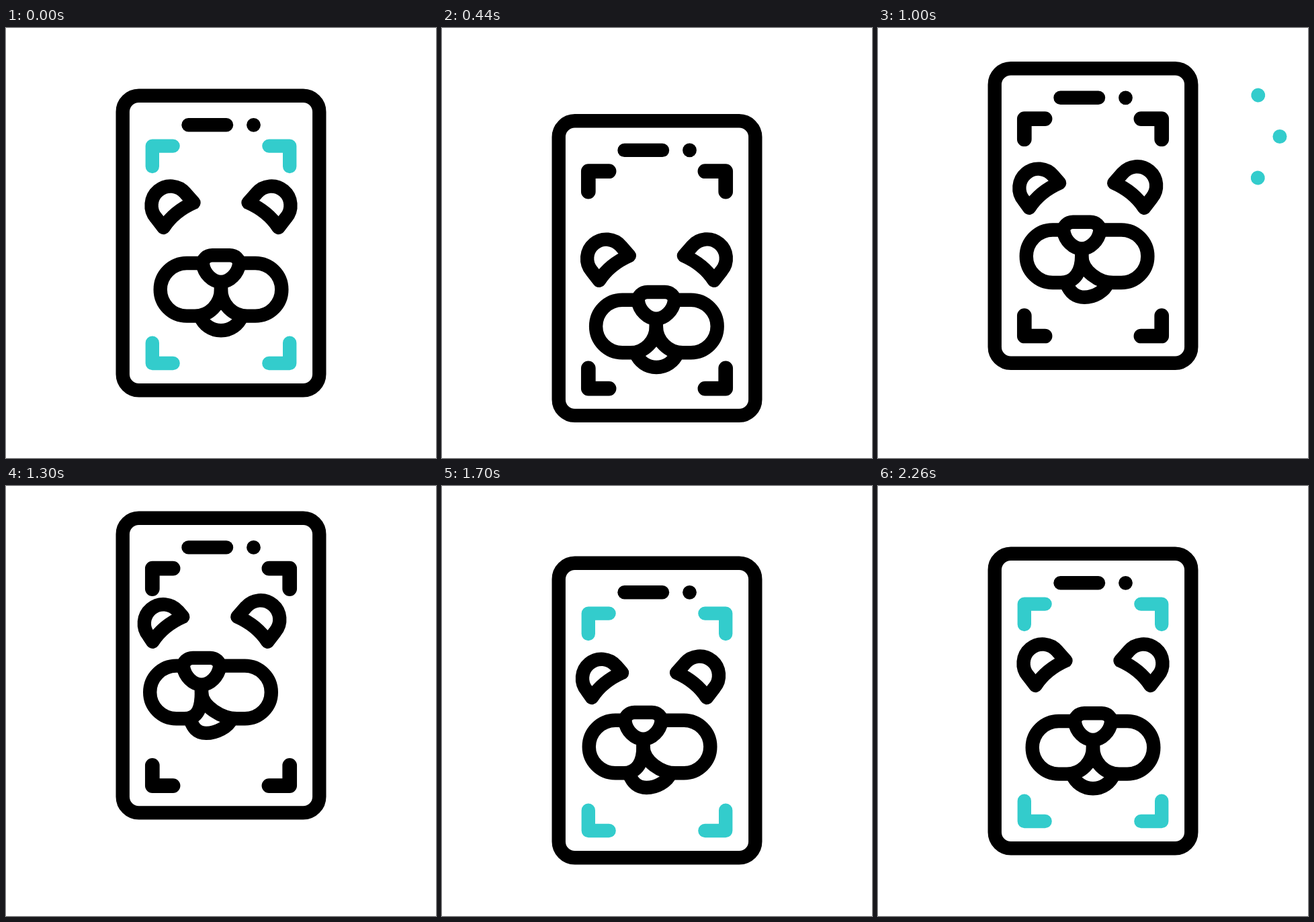
These frames come from a looping animation (640 by 640 pixels, 2400 ms). An HTML page with a canvas:

```html
<!DOCTYPE html>
<html lang="en">
<head>
<meta charset="utf-8">
<title>Face scan</title>
<style>
  html, body { margin: 0; width: 100%; height: 100%; overflow: hidden; background: #fff; }
  canvas { display: block; width: 100vmin; height: 100vmin; }
</style>
</head>
<body>
<canvas id="stage" width="640" height="640"></canvas>
<script>
const LOOP = 2400, STEP = 20, LINE = 20.4;
const ctx = document.getElementById('stage').getContext('2d');

const clamp = u => Math.min(1, Math.max(0, u));
const lerp = (a, b, u) => a + (b - a) * u;
const smooth = (t, from, to) => {
  const u = clamp((t - from) / (to - from));
  return u * u * (3 - 2 * u);
};

// Monotone cubic curve through [time, value] pairs.
function track(keys) {
  const last = keys.length - 1;
  const rise = i => (keys[i + 1][1] - keys[i][1]) / (keys[i + 1][0] - keys[i][0]);
  const slope = keys.map((key, i) => {
    if (i === 0 || i === last) return 0;
    const a = rise(i - 1), b = rise(i);
    return a * b <= 0 ? 0 : 2 * a * b / (a + b);
  });
  return t => {
    if (t <= keys[0][0]) return keys[0][1];
    if (t >= keys[last][0]) return keys[last][1];
    let i = 0;
    while (t > keys[i + 1][0]) i++;
    const [t0, v0] = keys[i], [t1, v1] = keys[i + 1];
    const d = t1 - t0, u = (t - t0) / d, w = 1 - u;
    return v0 * w * w * (1 + 2 * u) + v1 * u * u * (3 - 2 * u)
      + d * u * w * (w * slope[i] - u * slope[i + 1]);
  };
}

const phoneY = track([[200, 0], [455, 38], [680, 5.8], [740, -8.5], [1000, -40.5],
  [1300, -52.9], [1370, -55.3], [1700, 14], [1780, 38], [2040, -20.5], [2260, 0]]);
const turn = track([[340, 0], [440, 0.04], [680, 0.12], [1000, 0.578], [1300, 1],
  [1350, 1.01], [1700, 0.707], [2020, 0]]);
const nod = t => smooth(t, 200, 440) * (1 - smooth(t, 1800, 2260));
const tint = t => {
  if (t < 530) return 1 - smooth(t, 200, 430);
  if (t < 1100) return smooth(t, 620, 790) * (1 - smooth(t, 800, 970));
  return smooth(t, 1350, 1600);
};

const sparks = [
  [504.4, 140.9, 565.8, 100],
  [505, 161.5, 598, 161.5],
  [502.7, 182.6, 565.3, 223]
];

function stroke(draw, color = '#000', width = LINE) {
  ctx.strokeStyle = color;
  ctx.lineWidth = width;
  ctx.beginPath();
  draw();
  ctx.stroke();
}

function line(...p) {
  ctx.moveTo(p[0], p[1]);
  for (let i = 2; i < p.length; i += 2) ctx.lineTo(p[i], p[i + 1]);
}

function shifted(x, y, draw) {
  ctx.save();
  ctx.translate(x, y);
  draw();
  ctx.restore();
}

function mirrored(draw) {
  ctx.save();
  ctx.translate(640, 0);
  ctx.scale(-1, 1);
  draw();
  ctx.restore();
}

// The corner marks go from teal (glow 1) to slightly bolder black (glow 0).
function phone(glow) {
  stroke(() => ctx.roundRect(173.7, 100.7, 292.6, 438.6, 24));
  stroke(() => line(271.5, 144.3, 328, 144.3));
  ctx.beginPath();
  ctx.arc(368.5, 144.3, 10.4, 0, 7);
  ctx.fill();
  const teal = Math.round(204 * glow);
  const color = `rgb(${Math.round(51 * glow)}, ${teal}, ${teal})`;
  const corners = () => stroke(() => {
    line(217.8, 206, 217.8, 175.6, 248.6, 175.6);
    line(217.8, 468.7, 217.8, 499, 248.6, 499);
  }, color, lerp(21.7, LINE, glow));
  corners();
  mirrored(corners);
}

// dx, dy move the rounded back of the ear against its tips.
function ear(dx, dy) {
  stroke(() => {
    ctx.moveTo(279.5, 260);
    ctx.quadraticCurveTo(250, 273, 234.5, 297);
    ctx.arc(245 + dx, 264 + dy, 28.5, Math.PI * 7 / 9, Math.PI * 16 / 9);
    ctx.closePath();
  });
}

function muzzle(x, noseX) {
  const mid = 320 + noseX;
  for (const side of [-1, 1]) {
    const at = d => 320 + x + side * d;
    stroke(() => {
      ctx.moveTo(mid + side * 30, 350);
      ctx.lineTo(at(51), 350);
      ctx.arc(at(51), 389.3, 39.3, -Math.PI / 2, Math.PI / 2, side < 0);
      ctx.lineTo(at(39), 428.6);
      ctx.bezierCurveTo(at(17.5), 428.6, mid, 411, mid, 389);
      ctx.lineTo(mid, 379);
    });
  }
  const chin = 320 + noseX * 0.76;
  stroke(() => {
    ctx.moveTo(289.3 + x, 429.5);
    ctx.bezierCurveTo(293.8 + x, 441.5, chin - 14.4, 450.3, chin, 450.3);
    ctx.bezierCurveTo(chin + 14.4, 450.3, 346.2 + x, 441.5, 350.7 + x, 429.5);
  });
  stroke(() => {
    ctx.moveTo(mid - 13, 338.3);
    ctx.lineTo(mid + 13, 338.3);
    ctx.bezierCurveTo(mid + 21, 338.3, mid + 27.5, 344, mid + 27, 352);
    ctx.bezierCurveTo(mid + 25, 365.5, mid + 13, 378, mid, 378);
    ctx.bezierCurveTo(mid - 13, 378, mid - 25, 365.5, mid - 27, 352);
    ctx.bezierCurveTo(mid - 27.5, 344, mid - 21, 338.3, mid - 13, 338.3);
    ctx.closePath();
  });
}

function burst(t) {
  if (t <= 602 || t >= 1020) return;
  const head = smooth(t, 602, 885);
  const tail = Math.min(smooth(t, 602, 986), head - 0.0001);
  for (const [x0, y0, x1, y1] of sparks) {
    stroke(() => line(lerp(x0, x1, tail), lerp(y0, y1, tail),
      lerp(x0, x1, head), lerp(y0, y1, head)), '#33cccc', 21);
  }
}

function render(t) {
  ctx.fillStyle = '#fff';
  ctx.fillRect(0, 0, 640, 640);
  ctx.fillStyle = '#000';
  ctx.lineCap = ctx.lineJoin = 'round';

  const k = turn(t), lift = nod(t) * (1 - k);
  shifted(0, phoneY(t), () => {
    phone(tint(t));
    shifted(-16.2 * k, 43.5 * lift - 12.4 * k, () => {
      ear(5.5 * k, 6 * k);
      mirrored(() => ear(0, 0));
    });
    shifted(0, 19 * lift - 29.5 * k, () => muzzle(-15.5 * k, -29 * k));
  });
  burst(t);
}

let start;
function tick(now) {
  start ??= now;
  render(Math.floor((now - start) % LOOP / STEP) * STEP);
  requestAnimationFrame(tick);
}
render(0);
requestAnimationFrame(tick);
</script>
</body>
</html>
```
